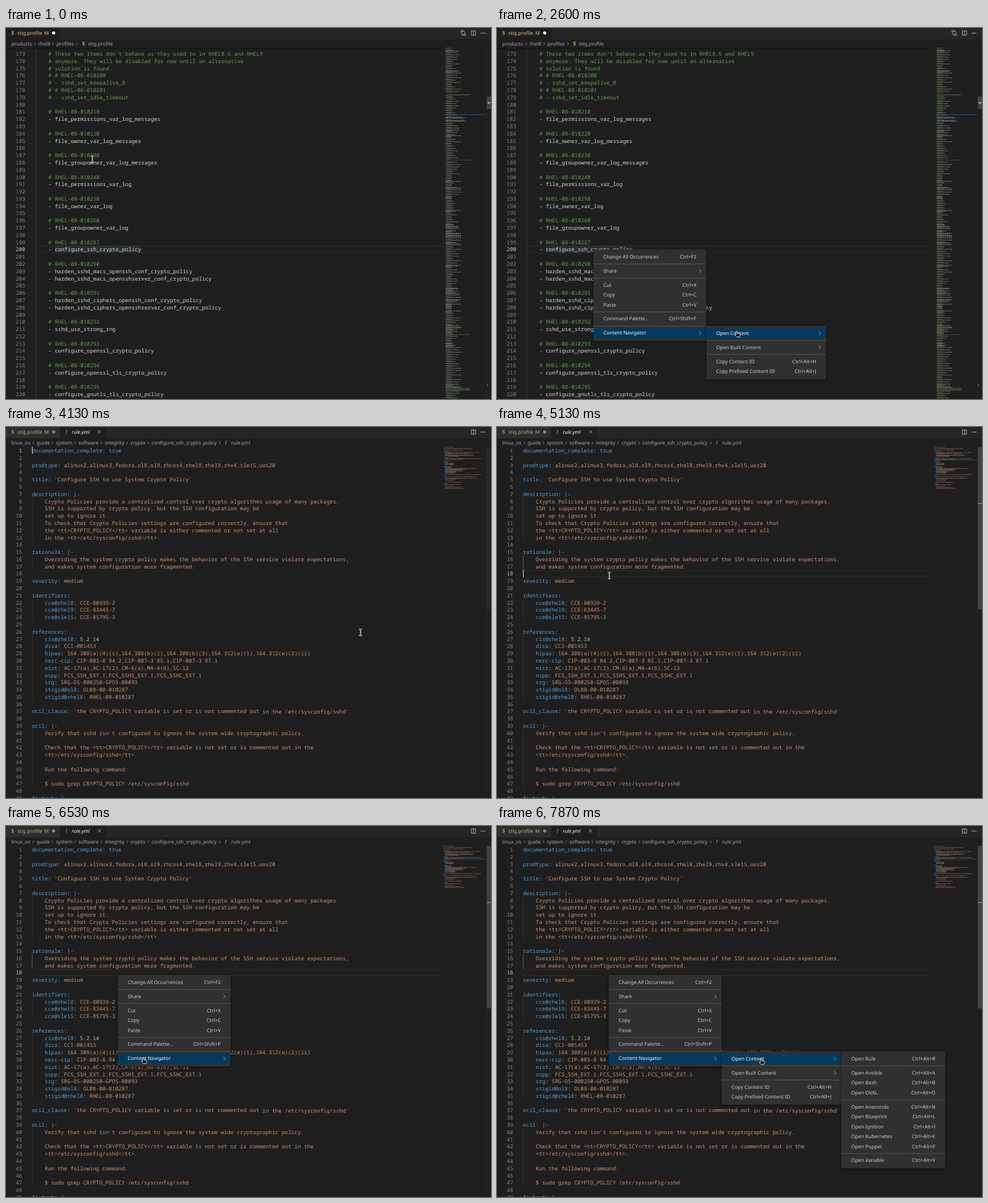
These frames come from a looping animation (855x655 px, 8 s). An HTML page:

```html
<!DOCTYPE html>
<html lang="en">
<head>
<meta charset="utf-8">
<title>Content navigator</title>
<style>
html, body { margin: 0; width: 100%; height: 100%; overflow: hidden; background: #1e1e1e; }
svg { display: block; }
/* the minute turn keeps baselines from snapping to whole pixels */
text { white-space: pre; text-rendering: geometricPrecision; font: 8.75px "Noto Sans", sans-serif; transform: rotate(.002deg); }
.code text { font: 9.425px "Noto Sans Mono", monospace; }
.icon { font: bold 9.5px "Noto Sans Mono", monospace; }
.italic { font-style: italic; }
path { fill: none; }
</style>
</head>
<body>
<svg id="stage" width="855" height="655" viewBox="0 0 855 655"></svg>
<script>
const LOOP = 8000, FRAME = 1000 / 15, ROW = 12.79, MINI = 0.673;
const LIGHT = '#d4d4d4', GREEN = '#6a9955', BLUE = '#569cd6', ORANGE = '#ce9178',
      PURPLE = '#c586c0', NUMBER = '#b5cea8', GREY = '#a9a9a9', MODIFIED = '#e2c08d';

const profile = `
    # These two items don't behave as they used to in RHEL8.6 and RHEL9
    # anymore. They will be disabled for now until an alternative
    # solution is found.
    # # RHEL-08-010200
    # - sshd_set_keepalive_0
    # # RHEL-08-010201
    # - sshd_set_idle_timeout

    # RHEL-08-010210
    - file_permissions_var_log_messages

    # RHEL-08-010220
    - file_owner_var_log_messages

    # RHEL-08-010230
    - file_groupowner_var_log_messages

    # RHEL-08-010240
    - file_permissions_var_log

    # RHEL-08-010250
    - file_owner_var_log

    # RHEL-08-010260
    - file_groupowner_var_log

    # RHEL-08-010287
    - configure_ssh_crypto_policy

    # RHEL-08-010290
    - harden_sshd_macs_openssh_conf_crypto_policy
    - harden_sshd_macs_opensshserver_conf_crypto_policy

    # RHEL-08-010291
    - harden_sshd_ciphers_openssh_conf_crypto_policy
    - harden_sshd_ciphers_opensshserver_conf_crypto_policy

    # RHEL-08-010292
    - sshd_use_strong_rng

    # RHEL-08-010293
    - configure_openssl_crypto_policy

    # RHEL-08-010294
    - configure_openssl_tls_crypto_policy

    # RHEL-08-010295
    - configure_gnutls_tls_crypto_policy`.split('\n');

const rule = `documentation_complete: true

prodtype: alinux2,alinux3,fedora,ol8,ol9,rhcos4,rhel8,rhel9,rhv4,sle15,uos20

title: 'Configure SSH to use System Crypto Policy'

description: |-
    Crypto Policies provide a centralized control over crypto algorithms usage of many packages.
    SSH is supported by crypto policy, but the SSH configuration may be
    set up to ignore it.
    To check that Crypto Policies settings are configured correctly, ensure that
    the <tt>CRYPTO_POLICY</tt> variable is either commented or not set at all
    in the <tt>/etc/sysconfig/sshd</tt>.

rationale: |-
    Overriding the system crypto policy makes the behavior of the SSH service violate expectations,
    and makes system configuration more fragmented.

severity: medium

identifiers:
    cce@rhel8: CCE-80939-2
    cce@rhel9: CCE-83445-7
    cce@sle15: CCE-85795-3

references:
    cis@rhel8: 5.2.14
    disa: CCI-001453
    hipaa: 164.308(a)(4)(i),164.308(b)(1),164.308(b)(3),164.312(e)(1),164.312(e)(2)(ii)
    nerc-cip: CIP-003-8 R4.2,CIP-007-3 R5.1,CIP-007-3 R7.1
    nist: AC-17(a),AC-17(2),CM-6(a),MA-4(6),SC-13
    ospp: FCS_SSH_EXT.1,FCS_SSHS_EXT.1,FCS_SSHC_EXT.1
    srg: SRG-OS-000250-GPOS-00093
    stigid@ol8: OL08-00-010287
    stigid@rhel8: RHEL-08-010287

ocil_clause: 'the CRYPTO_POLICY variable is set or is not commented out in the /etc/sysconfig/sshd'

ocil: |-
    Verify that sshd isn't configured to ignore the system wide cryptographic policy.

    Check that the <tt>CRYPTO_POLICY</tt> variable is not set or is commented out in the
    <tt>/etc/sysconfig/sshd</tt>.

    Run the following command:

    $ sudo grep CRYPTO_POLICY /etc/sysconfig/sshd

fixtext: |-
    Configure the system to use the policy.

    Edit the following file:

    Comment out or remove the variable in it.
    Then restart the service to make the change active.`.split('\n');

const esc = s => s.replace(/&/g, '&amp;').replace(/</g, '&lt;');
const text = (x, y, s, fill, extra = '') => `<text x="${x}" y="${y}" fill="${fill}" ${extra}>${s}</text>`;
const rect = (x, y, w, h, fill, extra = '') =>
  `<rect x="${x}" y="${y}" width="${w}" height="${h}" fill="${fill}" ${extra}/>`;
const line = (d, stroke, width = 0.8, extra = '') =>
  `<path d="${d}" stroke="${stroke}" stroke-width="${width}" ${extra}/>`;
const chevron = (x, y, r, color) => line(`M${x - r / 2} ${y - r}l${r} ${r} ${-r} ${r}`, color);

const profileTokens = s => [[s, /^\s*#/.test(s) ? GREEN : LIGHT]];
function ruleTokens(s) {
  const m = s.match(/^(\s*[\w@-]+):(.*)$/);
  if (!m) return [[s, ORANGE]];
  const head = [[m[1], BLUE], [':', LIGHT]], value = m[2];
  if (value === ' |-') return [...head, [' |', PURPLE], ['-', BLUE]];
  return [...head, [value, value === ' true' ? BLUE : /^ [\d.]+$/.test(value) ? NUMBER : ORANGE]];
}

// top is the middle of the first row
function code(rows, first, x, numX, top) {
  return '<g class="code">' + rows.map((tokens, i) => {
    const y = top + i * ROW + 3.7;
    return text(numX, y, first + i, '#858585', `text-anchor="end" id="n${first + i}"`) +
      `<text x="${x}" y="${y}">` +
      tokens.map(([s, c]) => `<tspan fill="${c}">${esc(s)}</tspan>`).join('') + '</text>';
  }).join('') + '</g>';
}

const currentLine = (y, x) => line(`M${x} ${y - 5.7}H766M${x} ${y + 5.7}H766`, '#282828', 1.35);

function minimap(rows, x, y) {
  const paths = {};
  rows.forEach((tokens, i) => {
    let col = 0;
    for (const [s, color] of tokens) {
      for (const m of s.matchAll(/[^\s_]+/g))
        paths[color] = (paths[color] || '') +
          `M${(x + (col + m.index) * MINI).toFixed(2)} ${(y + i * 2 * MINI).toFixed(2)}h${(m[0].length * MINI).toFixed(2)}`;
      col += s.length;
    }
  });
  return Object.entries(paths).map(([c, d]) => line(d, c, 0.95, 'opacity=".55"')).join('');
}

// Plausible neighbours of the visible profile lines, for the minimap only
function fullProfile() {
  let seed = 7;
  const rand = () => (seed = seed * 16807 % 2147483647) / 2147483647;
  const rows = [], note = n => n === 259 || n === 488 || (n > 557 && n < 562);
  while (rows.length < 461) {
    const n = 112 + rows.length;
    if (n === 172) { rows.push(...profile); continue; }
    const phase = n % 3;
    rows.push(note(n) ? '    # ' + 'these rules are not included in '.repeat(2)
      : phase === 0 ? '    # RHEL-08-010000'
      : phase === 1 || rand() < 0.25 ? '    - ' + 'rule_'.repeat(3 + rand() * 6) : '');
  }
  return rows.map(profileTokens);
}

const crumbs = list => list.map(([x, s], i) =>
  text(x, 30.8, s, GREY) + (i ? chevron(x - 6, 28, 2.4, GREY) : '')).join('');
const dollar = (x, y) => text(x, y, '$', '#8dc149', 'class="icon"');
const bang = (x, y) => text(x, y, '!', '#a074c4', 'class="icon italic"');
const toolbar = line('M820.3 5h7.6v7.8h-7.6zM824.1 5v7.8', '#c5c5c5', 0.9) +
  [838, 841, 844].map(x => `<circle cx="${x}" cy="9" r=".9" fill="#c5c5c5"/>`).join('');
const compare = line('M803 6.5v4q0 1.5 1.5 1.5h2.5m-1.5-1.6l1.6 1.6-1.6 1.6M809 11v-4q0-1.5-1.5-1.5h-2.5m1.5-1.6l-1.6 1.6 1.6 1.6', '#c5c5c5') +
  [[803, 5.3], [809, 12.2]].map(([x, y]) => `<circle cx="${x}" cy="${y}" r="1.3" fill="#252526" stroke="#c5c5c5" stroke-width=".8"/>`).join('');
const header = rect(0, 0, 855, 35, '#1e1e1e') + rect(0, 0, 855, 20.1, '#252526') + toolbar;
const profileTab = (bg, dot, dim) => rect(0, 0, 95.3, 20.1, bg) + `<g opacity="${dim}">` + dollar(9, 12) +
  text(20, 11.7, 'stig.profile', MODIFIED) + text(67.5, 11.7, 'M', MODIFIED) + '</g>' +
  `<circle cx="84" cy="8.7" r="2.7" fill="${dot}"/>`;
const scrollbar = (y, h) => line('M847.3 35V655', '#303030', 0.7) + rect(847.5, y, 7.5, h, '#424242', 'class="slider"');
const miniMark = (x, y) => line(`M${x} ${y}H847`, '#264f78', 1.1);

const mid = n => 41.35 + (n - 1) * ROW;
const guide = (a, b, color) => line(`M46.2 ${mid(a) - 6.4}V${mid(b) + 6.4}`, color, 0.7);

const MID200 = 390.7;
const profileScene = `<g id="profile">` +
  currentLine(MID200, 52) + rect(86, MID200 - 6.4, 152.5, ROW, '#2a2f32') +
  line('M52.4 35V655', '#505050', 0.7) +
  code(profile.map(profileTokens), 172, 52.1, 34, MID200 - 28 * ROW) +
  minimap(fullProfile(), 772, 35.3) + miniMark(772, 152.9) + scrollbar(121, 22) +
  line('M848 132.2H855', '#a0a0a0', 1) + `<circle cx="851.3" cy="132.2" r="1.9" fill="#a0a0a0"/>` +
  rect(847.8, 629, 2, 3.5, '#5d6b20') +
  header + profileTab('#1e1e1e', '#fff', 1) + compare +
  crumbs([[9.5, 'products'], [57, 'rhel8'], [89, 'profiles'], [131, '']]) +
  dollar(134, 31) + text(144.5, 30.8, 'stig.profile', GREY) +
  rect(0, 35, 766, 1, '#000', 'opacity=".4"') + rect(0, 36, 766, 1.5, '#000', 'opacity=".18"') + '</g>';

const ruleScene = `<g id="rule">` +
  [[8, 13], [16, 17], [22, 24], [27, 35], [40, 47]].map(([a, b]) => guide(a, b, '#404040')).join('') +
  `<g id="line18">` + currentLine(mid(18), 46) + guide(16, 17, '#707070') + '</g>' +
  code(rule.slice(0, 49).map(ruleTokens), 1, 45.7, 28.5, mid(1)) +
  minimap(rule.map(ruleTokens), 771, 35.6) + scrollbar(35, 287) +
  `<g id="mark18">` + miniMark(771, 58.3) + line('M847.5 135.2H855', '#a0a0a0', 1.2) + '</g>' +
  rect(45.8, 0, 1.3, ROW, '#c8c8c6', 'id="caret"') +
  header + profileTab('#2d2d2d', '#8a8a8a', 0.85) + rect(95.8, 0, 80.7, 20.1, '#1e1e1e') +
  bang(103, 12) + text(116, 11.7, 'rule.yml', '#fff', 'class="italic"') +
  line('M162 5.9l5.6 5.6m0-5.6l-5.6 5.6', '#d0d0d0') +
  crumbs([[9.5, 'linux_os'], [54, 'guide'], [88, 'system'], [127.5, 'software'], [174, 'integrity'],
    [219.5, 'crypto'], [256.5, 'configure_ssh_crypto_policy'], [383, '']]) +
  bang(384, 31) + text(397, 30.8, 'rule.yml', GREY) + '</g>';

function makeMenu(id, w, spec) {
  let y = 13, body = '', seps = '';
  const rows = [];
  for (const item of spec.split('\n')) {
    if (item === '-') {
      seps += `M0 ${y - 5}H${w}`;
      y += 7.4;
      continue;
    }
    const [label, key] = item.split('|');
    body += '<g fill="#ccc">' + text(17.5, y + 2.7, label, 'inherit') +
      (key === '>' ? chevron(w - 11, y, 3.4, '#ccc') : text(w - 17.3, y + 2.7, key, 'inherit', 'text-anchor="end"')) + '</g>';
    rows.push(y);
    y += 17.5;
  }
  const h = y - 3.7;
  const svg = `<g id="${id}">` + rect(0, 0, w, h, '#303031', 'rx="3.4" style="filter:drop-shadow(0 1.3px 2.7px rgba(0,0,0,.5))"') +
    rect(0, 0, w, 17.5, '#04395e') + line(seps, '#606060') + body + '</g>';
  return { id, w, h, rows, svg };
}

const menus = [
  makeMenu('context', 199, `Change All Occurrences|Ctrl+F2
-
Share|>
-
Cut|Ctrl+X
Copy|Ctrl+C
Paste|Ctrl+V
-
Command Palette...|Ctrl+Shift+P
-
Content Navigator|>`),
  makeMenu('navigator', 211, `Open Content|>
-
Open Built Content|>
-
Copy Content ID|Ctrl+Alt+H
Copy Prefixed Content ID|Ctrl+Alt+J`),
  makeMenu('open', 183, `Open Rule|Ctrl+Alt+R
-
Open Ansible|Ctrl+Alt+A
Open Bash|Ctrl+Alt+B
Open OVAL|Ctrl+Alt+O
-
Open Anaconda|Ctrl+Alt+N
Open Blueprint|Ctrl+Alt+L
Open Ignition|Ctrl+Alt+I
Open Kubernetes|Ctrl+Alt+K
Open Puppet|Ctrl+Alt+P
-
Open Variable|Ctrl+Alt+V`)
];
const parentRow = [6, 0];

const beam = 'M-2.6 -5.6Q0 -5.6 0 -4.2Q0 -5.6 2.6 -5.6M0 -4.4V4.4M-2.6 5.6Q0 5.6 0 4.2Q0 5.6 2.6 5.6';
const solid = 'style="fill:#111" stroke-linejoin="round"';
const pointers = `<g id="ibeam">${line(beam, '#fff', 2)}${line(beam, '#111', 0.7)}</g>` +
  `<g id="arrow">${line('M0 0V10.6L2.4 8.4 4.1 12.2 5.8 11.4 4.2 7.9 7.3 7.6Z', '#fff', 0.9, solid)}</g>` +
  `<g id="hand">${line('M-1.1 1Q0 -.4 1.1 1V4.4L5.2 5.2Q6.3 5.7 6 7.8L5 11H0L-2.9 7.6Q-2.8 5.9 -1.1 6.9Z', '#fff', 0.9, solid)}</g>`;

document.getElementById('stage').innerHTML =
  rect(0, 0, 855, 655, '#1e1e1e') + profileScene + ruleScene + menus.map(m => m.svg).join('') + pointers;

const el = id => document.getElementById(id);
const show = (id, on) => el(id).setAttribute('display', on ? 'inline' : 'none');
const lightNumber = (n, on) => el('n' + n).setAttribute('fill', on ? '#c6c6c6' : '#858585');
const ruleSlider = document.querySelector('#rule .slider');
lightNumber(200, true);

// time, x, y of the pointer
const path = [[0, 152, 231.5], [870, 168, 388.5], [1000, 169.5, 390], [2599, 169.5, 390], [2600, 422.5, 534.5],
  [2670, 424.5, 534.5], [3000, 424.5, 534.5], [3400, 600, 311], [3600, 625, 362], [4200, 625, 362.5],
  [4730, 246, 249], [4800, 246, 249], [4930, 198, 262], [5930, 198, 262], [6530, 242, 408.5],
  [6870, 242, 408.5], [7530, 459.5, 410], [7869, 459.5, 410], [7870, 465.5, 410]];

function pointerAt(t) {
  const i = path.findIndex(p => p[0] > t);
  if (i < 0) return path[path.length - 1].slice(1);
  const [t0, x0, y0] = path[i - 1], [t1, x1, y1] = path[i];
  const s = (t - t0) / (t1 - t0), e = s * s * (3 - 2 * s);
  return [x0 + (x1 - x0) * e, y0 + (y1 - y0) * e];
}

const depthSteps = [[1400, 1], [2600, 2], [2800, 3], [3930, 0], [5800, 1], [6870, 2], [7670, 3]];

function render(now) {
  const t = Math.floor((now % LOOP + 5) / FRAME) * FRAME + 4;
  const inRule = t >= 4130, clicked = t >= 5130;
  const depth = depthSteps.reduce((d, [at, n]) => t >= at ? n : d, 0);
  const places = inRule ? [[197, 263], [396, 398], [607, 398]] : [[170, 391], [369, 526], [580, 346]];
  const [px, py] = pointerAt(t);

  show('profile', !inRule);
  show('rule', inRule);
  show('line18', clicked);
  show('mark18', clicked);
  lightNumber(1, !clicked);
  lightNumber(18, clicked);
  ruleSlider.setAttribute('opacity', t < 4270 ? 0.25 : 1);
  show('caret', inRule && (t < 4600 || (clicked && t < 5600)));
  el('caret').setAttribute('y', mid(clicked ? 18 : 1) - ROW / 2);

  let over = false;
  menus.forEach(({ id, w, h, rows }, i) => {
    const g = el(id), open = i < depth, [x, y] = places[i];
    show(id, open);
    if (!open) return;
    g.setAttribute('transform', `translate(${x} ${y})`);
    const inside = px >= x && px < x + w && py >= y && py < y + h;
    over = over || inside;
    let hot = inside ? rows.findIndex(r => Math.abs(py - y - r) < 8.75) : -1;
    if (i + 1 < depth) hot = parentRow[i];
    const bar = g.children[1];
    bar.setAttribute('display', hot < 0 ? 'none' : 'inline');
    if (hot >= 0) bar.setAttribute('y', rows[hot] - 8.75);
    rows.forEach((_, k) => g.children[3 + k].setAttribute('fill', k === hot ? '#fff' : '#ccc'));
  });

  const shape = !depth ? 'ibeam' : over ? 'hand' : 'arrow';
  for (const id of ['ibeam', 'arrow', 'hand']) show(id, id === shape);
  el(shape).setAttribute('transform', `translate(${px} ${py})`);
}

function tick() {
  render(performance.now());
  requestAnimationFrame(tick);
}
tick();
</script>
</body>
</html>
```
